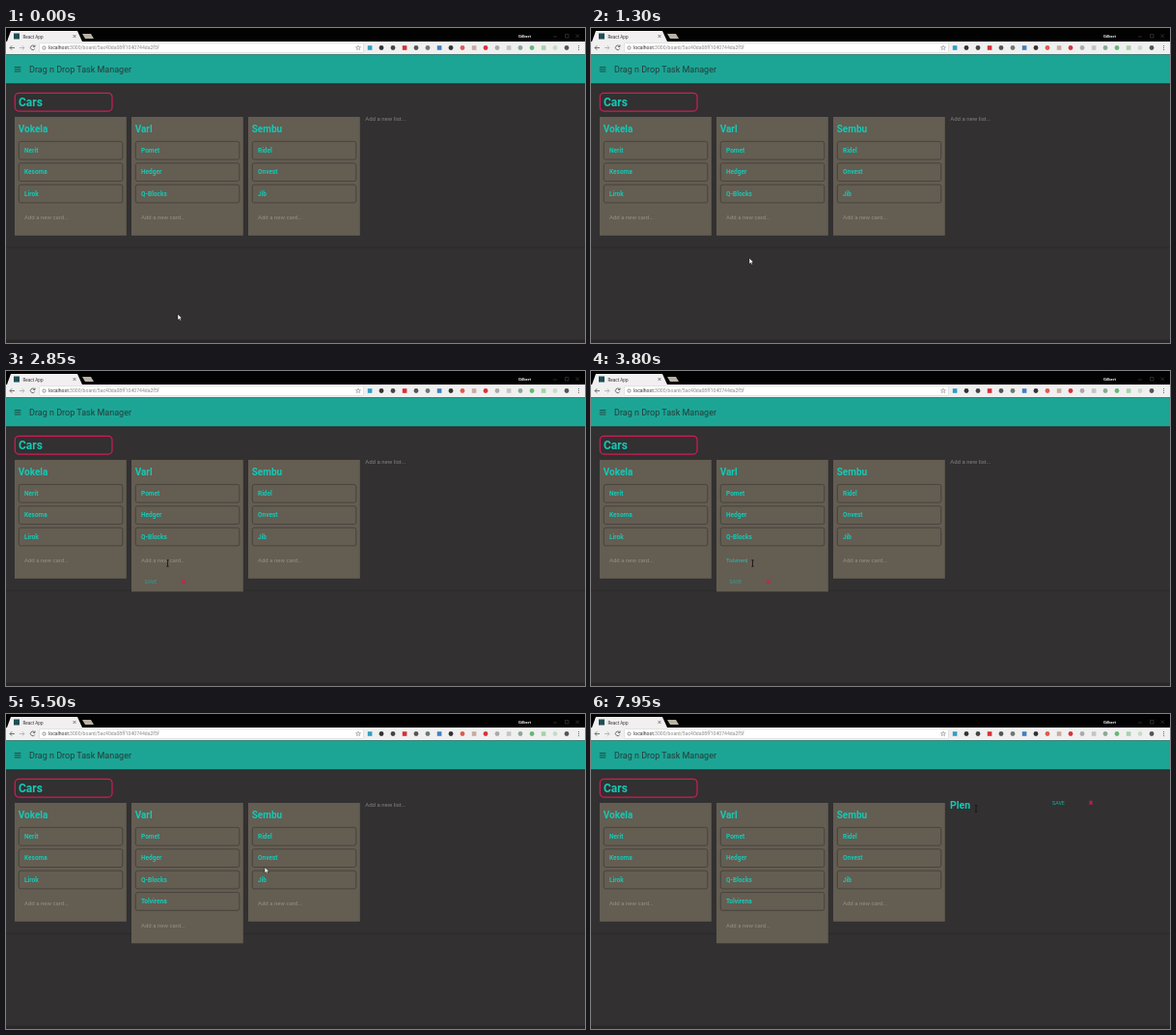
Write an HTML page that moves like this. It is 600 by 326 pixels and loops after 8000 ms.

```html
<!DOCTYPE html>
<html lang="en">
<head>
<meta charset="utf-8">
<title>Task board</title>
<style>
  html, body { margin: 0; width: 100%; height: 100%; overflow: hidden; background: #323031; }
  svg { display: block; width: 100vw; height: 100vh; font-family: Roboto, "Liberation Sans", sans-serif; }
</style>
</head>
<body>
<svg id="stage" viewBox="0 0 600 326" xmlns="http://www.w3.org/2000/svg">
  <g id="browser"></g>
  <g id="page"></g>
  <g id="lists"></g>
  <g id="newList"></g>
  <g id="arrow">
    <path d="M0 0V6.3L1.5 5L2.5 7.1L3.5 6.6L2.6 4.6H4.5Z" fill="#fff" stroke="#111" stroke-width=".5"/>
  </g>
  <g id="beam">
    <path d="M-1.2 -3.2H1.2M0 -3.2V3.2M-1.2 3.2H1.2" fill="none" stroke="#111" stroke-width=".8"/>
  </g>
</svg>
<script>
const LOOP = 8000, STEP = 50;
const TEAL = '#14c9b6', BAR = '#1ca595', PANEL = '#645d52', PINK = '#d01c56', DARK = '#323031';
const CLICK_CARD = 2800, TYPE_CARD = 3400, SAVE_CARD = 5000, ADD_CARD = 5100, CLICK_LIST = 6750;
const CARD_NAME = 'Tolvirena', LIST_NAME = 'Plen';
const LIST_KEYS = [7000, 7250, 7450, 7950];

const boards = [
  { x: 9, name: 'Vokela', cards: ['Nerit', 'Kesoma', 'Lirok'] },
  { x: 130, name: 'Varl', cards: ['Pomet', 'Hedger', 'Q-Blocks'] },
  { x: 251, name: 'Sembu', cards: ['Ridel', 'Onvest', 'Jib'] }
];

// time, x, y of the pointer
const pointerPath = [
  [0, 178, 296], [600, 178, 295], [850, 174, 277], [1300, 164, 238], [1700, 166, 207],
  [2000, 167.5, 199], [4300, 167.5, 199], [4750, 149.5, 217], [5150, 149.5, 217],
  [5550, 285, 150], [5950, 403, 99], [6100, 399, 98], [LOOP, 399, 98]
];

const el = id => document.getElementById(id);
const rect = (x, y, w, h, fill, extra = '') =>
  `<rect x="${x}" y="${y}" width="${w}" height="${h}" fill="${fill}" ${extra}/>`;
const text = (x, y, size, fill, str, weight = 400) =>
  `<text x="${x}" y="${y}" font-size="${size}" fill="${fill}" font-weight="${weight}">${str}</text>`;
const line = (d, stroke, width = .8) =>
  `<path d="${d}" fill="none" stroke="${stroke}" stroke-width="${width}"/>`;
const dot = (x, y, r, fill) => `<circle cx="${x}" cy="${y}" r="${r}" fill="${fill}"/>`;
const caret = `<tspan font-weight="300" fill="#9fb5ad">|</tspan>`;
const cross = (x, y) => line(`M${x - 1.5} ${y - 1.8}l3 3.6m0 -3.6l-3 3.6`, PINK, 1.3);

function drawBrowser() {
  const icons = ['#2f9fc4', '#333', '#444', '#d62f35', '#555', '#6d7a72', '#3f7fc1', '#333', '#e05a50',
    '#c9aba0', '#d8343c', '#aaa', '#c4c4c4', '#8ba894', '#62b977', '#a5d3a8', '#c6dcc8', '#555'];
  el('browser').innerHTML =
    rect(0, 0, 600, 14, '#020202') +
    '<path d="M1 14L5 3H74L79 14Z" fill="#f1eff0"/>' +
    rect(8, 5.5, 6, 6, '#1d4f55') +
    text(17.5, 10.5, 4.6, '#333', 'React App') +
    line('M69.5 7l3 3m0 -3l-3 3', '#555', .7) +
    '<path d="M79 6H88L91 11H82Z" fill="#b9b2a4"/>' +
    text(531, 10, 4.3, '#eee', 'Gilbert', 700) +
    line('M567 9h4M579.5 6.5h3.5v3.5h-3.5zM590.5 6.5l3.5 3.5m0 -3.5l-3.5 3.5', '#3a3a3a', .7) +
    rect(0, 14, 600, 13.5, '#f1f0f0') +
    line('M9 20.5H4m2.2 -2.2L4 20.5l2.2 2.2', '#555') +
    line('M14 20.5h5m-2.2 -2.2l2.2 2.2l-2.2 2.2', '#aaa') +
    line('M29.6 19A2.3 2.3 0 1 0 29.8 21.3M30 17.5v1.9h-1.9', '#555') +
    rect(34.5, 15.5, 336, 10, '#fff', 'rx="1.2" stroke="#ccc" stroke-width=".5"') +
    dot(39.5, 20.5, 1.9, '#777') + dot(39.5, 20.5, 1.2, '#fff') +
    text(44, 22.3, 5.1, '#333',
      'localhost:<tspan fill="#888">3000/board/5ac40da08ff1040744da2f5f</tspan>') +
    line('M365 18l.7 1.7h1.8l-1.4 1.1l.5 1.8l-1.6 -1.1l-1.6 1.1l.5 -1.8l-1.4 -1.1h1.8z', '#777', .5) +
    icons.map((c, i) => i % 3 ? dot(377 + i * 12, 20.5, 2.4, c) : rect(374.8 + i * 12, 18.2, 4.6, 4.6, c)).join('') +
    [18.5, 20.5, 22.5].map(y => dot(593.5, y, .6, '#555')).join('');
}

function drawPage() {
  el('page').innerHTML =
    rect(0, 27.5, 600, 298.5, DARK) +
    rect(0, 27.5, 600, 30, BAR) +
    rect(0, 57.5, 600, 1, '#292d2d') +
    line('M8.8 40.6h6.6m-6.6 2.2h6.6m-6.6 2.2h6.6', '#24403d', .9) +
    text(24, 45.7, 9, '#263c3a', 'Drag n Drop Task Manager') +
    rect(9.3, 67.3, 100.7, 18.8, 'none', `rx="4" stroke="${PINK}" stroke-width="1.2"`) +
    text(13, 81.2, 12, TEAL, 'Cars', 700) +
    line('M0 227.2H600', '#2b292a', .8) +
    rect(0, 322.5, 600, 3.5, '#292728');
}

function drawList({ x, name, cards }, t) {
  const active = x === 130;
  const added = active && t >= ADD_CARD;
  const editing = active && t >= CLICK_CARD && t < SAVE_CARD;
  const shown = added ? [...cards, CARD_NAME] : cards;
  const inputY = 198 + (added ? 22.5 : 0);
  const height = added ? 145.3 : editing ? 136.3 : 122.8;
  const typed = editing && t >= TYPE_CARD
    ? CARD_NAME.slice(0, 1 + Math.floor((t - TYPE_CARD) / 55)) : '';

  let out = rect(x, 92, 115.8, height, PANEL) + text(x + 3.7, 108.4, 10, TEAL, name, 700);
  shown.forEach((card, i) => {
    const y = 117.4 + i * 22.4;
    out += rect(x + 4.3, y, 107.5, 18.7, 'none', 'rx="2" stroke="#3c3934" stroke-width=".7"') +
      text(x + 10, y + 11.6, 6.5, TEAL, card, 700);
  });
  if (active && t >= 1750 && t < CLICK_CARD) {
    const fade = Math.min(1, (t - 1750) / 300) * .07;
    out += rect(x + 4.3, 184.6, 107.5, 22, TEAL, `opacity="${fade}" rx="2"`);
  }
  out += typed
    ? text(x + 10, inputY, 6, TEAL, typed + caret)
    : text(x + 10, inputY, 6, '#97917f', 'Add a new card...');
  if (editing) out += text(x + 13.5, 219.8, 5.3, '#2fa293', 'SAVE') + cross(x + 53.8, 218);
  return out;
}

function drawNewList(t) {
  const typed = LIST_NAME.slice(0, LIST_KEYS.filter(k => t >= k).length);
  let out = typed
    ? text(372, 97.7, 10.5, TEAL, typed, 700)
    : text(372.3, 95.8, 6, '#858283', 'Add a new list...');
  if (t >= CLICK_LIST) out += text(478, 93.8, 5.3, '#17b3a3', 'SAVE') + cross(518, 91.8);
  return out;
}

function movePointer(t) {
  const i = pointerPath.findIndex(p => p[0] > t);
  const [t0, x0, y0] = pointerPath[i - 1], [t1, x1, y1] = pointerPath[i];
  const k = (t - t0) / (t1 - t0);
  const place = `translate(${x0 + (x1 - x0) * k} ${y0 + (y1 - y0) * k})`;
  const overInput = (t >= 1750 && t < 4450) || t >= 5900;
  for (const [id, on] of [['arrow', !overInput], ['beam', overInput]]) {
    el(id).setAttribute('transform', place);
    el(id).style.display = on ? '' : 'none';
  }
}

function render(t) {
  el('lists').innerHTML = boards.map(b => drawList(b, t)).join('');
  el('newList').innerHTML = drawNewList(t);
  movePointer(t);
}

drawBrowser();
drawPage();
const start = performance.now();
let last = -1;
function tick() {
  const t = Math.floor(((performance.now() - start) % LOOP) / STEP) * STEP;
  if (t !== last) render(last = t);
  requestAnimationFrame(tick);
}
tick();
</script>
</body>
</html>
```
